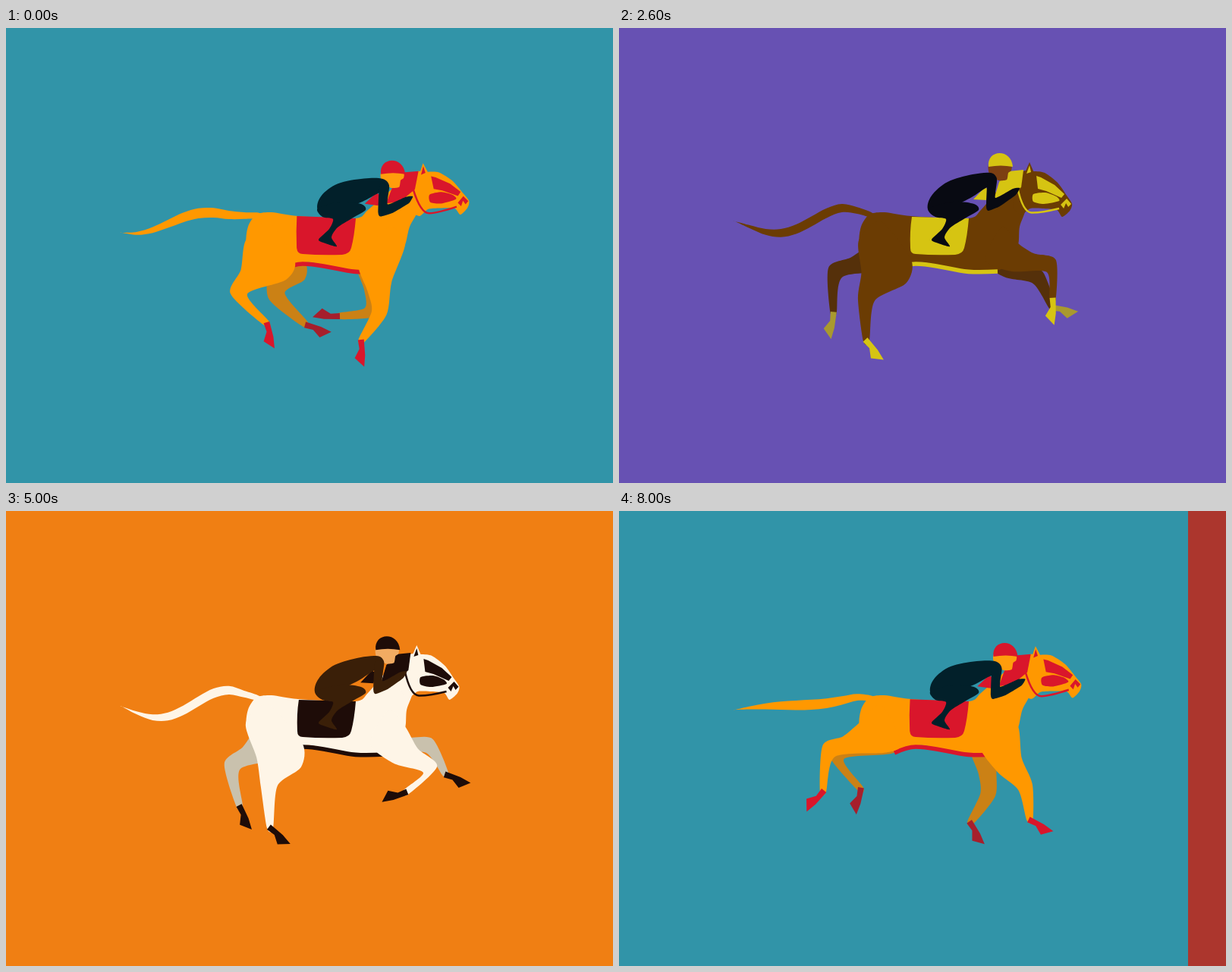
An HTML page with a canvas that plays this animation: 800x600 px, repeating every 8.1 s.

```html
<!DOCTYPE html>
<html lang="en">
<head>
<meta charset="utf-8">
<title>Gallop</title>
<style>
html, body { margin: 0; width: 100%; height: 100%; overflow: hidden; background: #3194a8; }
canvas { display: block; width: 800px; height: 600px; }
</style>
</head>
<body>
<canvas id="stage" width="800" height="600"></canvas>
<script>
const ctx = document.getElementById('stage').getContext('2d');
const LOOP = 8100, STRIDE = LOOP / 20, POSES = 12, STEP = 100;
const FIRST_WIPE = 1210, WIPE_EVERY = LOOP / 5, WIPE_SPEED = 2.42;

const scheme = (bg, coat, farCoat, trim, farTrim, suit, face) =>
  ({ bg, coat, farCoat, trim, farTrim, suit, face });
const SCHEMES = [
  scheme('#3194a8', '#ff9800', '#cb8115', '#d9162b', '#a61f2c', '#02202a', '#ff9d0c'),
  scheme('#6751b3', '#6b3c03', '#55300a', '#d6c412', '#a9992e', '#080a12', '#7c3f12'),
  scheme('#45620f', '#fdb55c', '#c6954c', '#d23a10', '#a63413', '#002c08', '#ff9a0a'),
  scheme('#f07f13', '#fef5e7', '#c9c1ad', '#1e0c08', '#1e0c08', '#3a1f08', '#f2ab62'),
  scheme('#ac362d', '#a0672c', '#80521f', '#1e0c08', '#1e0c08', '#2a1208', '#cf8a4a')
];

// One leg of each pair. Steps hold ankle x, ankle y and hoof angle, evenly
// spaced over the stride; the far leg runs ahead on the same track.
const HIND = {
  hip: [345, 286], bones: [75, 54], bend: -1, knee: 11,
  crest: [345, 255], edge: [316, 280], belly: [416, 303], bulge: [4, 2], groin: [.5, 196],
  far: [4, -12],
  steps: [[344, 390, 73], [392, 404, 15], [348, 418, 38], [304, 402, 62], [262, 376, 125], [288, 370, 120]]
};
const FRONT = {
  hip: [495, 300], bones: [76, 44], bend: 1, knee: 10,
  crest: [505, 262], edge: [526, 284], belly: [467, 310], bulge: [-5, 2], groin: [.45, 250],
  far: [-24, -4],
  steps: [[468, 413, 83], [462, 384, 178], [527, 371, 158], [604, 352, 18], [570, 398, 18], [512, 412, 38]]
};

const mix = (a, b, k) => a.map((v, i) => v + (b[i] - v) * k);
const add = (a, b, k = 1) => [a[0] + b[0] * k, a[1] + b[1] * k];
const pairs = list => {
  const out = [];
  for (let i = 0; i < list.length; i += 2) out.push([list[i], list[i + 1]]);
  return out;
};

// Smooth value on a cyclic list of keys.
function cycle(keys, u) {
  const n = keys.length, i = Math.floor(u), k = u - i;
  const [a, b, c, d] = [-1, 0, 1, 2].map(o => keys[(i + o + n) % n]);
  return b.map((v, j) => v + .5 * k * (c[j] - a[j] +
    k * (2 * a[j] - 5 * v + 4 * c[j] - d[j] + k * (3 * (v - c[j]) + d[j] - a[j]))));
}

function poly(color, list) {
  ctx.fillStyle = color;
  ctx.beginPath();
  pairs(list).forEach(p => ctx.lineTo(...p));
  ctx.fill();
}

// Closed curve through every point.
function blob(color, pts, pull = 1 / 6) {
  const n = pts.length, at = i => pts[(i + n) % n];
  ctx.fillStyle = color;
  ctx.beginPath();
  ctx.moveTo(...pts[0]);
  for (let i = 0; i < n; i++) {
    const [a, b, c, d] = [at(i - 1), at(i), at(i + 1), at(i + 2)];
    ctx.bezierCurveTo(
      b[0] + (c[0] - a[0]) * pull, b[1] + (c[1] - a[1]) * pull,
      c[0] - (d[0] - b[0]) * pull, c[1] - (d[1] - b[1]) * pull, c[0], c[1]);
  }
  ctx.fill();
}

function line(color, width, list) {
  const pts = pairs(list), last = pts.length - 1;
  ctx.strokeStyle = color;
  ctx.lineWidth = width;
  ctx.beginPath();
  ctx.moveTo(...pts[0]);
  for (let i = 1; i < last; i++) {
    ctx.quadraticCurveTo(...pts[i], ...(i === last - 1 ? pts[last] : mix(pts[i], pts[i + 1], .5)));
  }
  ctx.stroke();
}

function hoof(color, ankle, degrees) {
  ctx.save();
  ctx.translate(...ankle);
  ctx.rotate(degrees * Math.PI / 180);
  poly(color, [-2, 4, 10, 3.5, 21, 11, 34, 0, 19, -3, -2, -4]);
  ctx.restore();
}

function leg(kind, q, isFar, coat, trim) {
  const shift = isFar ? kind.far : [0, 0];
  const [x, y, angle] = cycle(kind.steps, (q + (isFar ? 2 : 0)) % POSES / 2);
  const ankle = add([x, y], shift), hip = add(kind.hip, shift, .5);

  // Two bones from hip to ankle.
  const dx = ankle[0] - hip[0], dy = ankle[1] - hip[1], dist = Math.hypot(dx, dy);
  const grow = Math.max(1, dist / (kind.bones[0] + kind.bones[1]));
  const [upper, lower] = kind.bones.map(b => b * grow);
  const along = (upper ** 2 - lower ** 2 + dist ** 2) / (2 * dist);
  const off = Math.sqrt(Math.max(0, upper ** 2 - along ** 2));
  const dir = [dx / dist, dy / dist], out = [dir[1] * kind.bend, -dir[0] * kind.bend];
  const knee = add(add(hip, dir, along), out, off);
  const shin = [(ankle[0] - knee[0]) / lower, (ankle[1] - knee[1]) / lower];
  const shinOut = [shin[1] * kind.bend, -shin[0] * kind.bend];

  const outer = add(knee, out, kind.knee), inner = add(knee, out, -kind.knee);
  const edge = isFar ? mix(kind.edge, kind.hip, .5) : kind.edge;
  const groin = add(mix(inner, kind.belly, .5), [2, 5]);
  blob(coat, [kind.crest, edge, add(mix(edge, outer, .52), kind.bulge), outer,
    add(ankle, shinOut, 4), add(ankle, shinOut, -4), inner, groin,
    [groin[0] * kind.groin[0] + kind.groin[1], 306]], .13);
  hoof(trim, ankle, angle);
}

// A wave that runs from the tip up to the dock.
function tail(q, color) {
  const top = [], low = [], n = 9;
  for (let i = 0; i <= n; i++) {
    const s = i / n, x = 334 - 181 * s;
    const wave = Math.cos((q - (x - 153) * .07) * Math.PI / 6);
    const y = 247 + 15 * s - 7 * Math.sin(s * 2 * Math.PI) + 8 * Math.min(1, s * 4) * wave;
    const w = 3 * (1 - s) + 5 * Math.sin(s * Math.PI);
    top.push([x, y - w]);
    low.unshift([x, y + w]);
  }
  blob(color, top.concat(low));
}

function head(c, h) {
  ctx.save();
  ctx.translate(545 + 11 * h, 190 + h);
  ctx.rotate(-.1 * h);
  ctx.translate(-545, -190);
  blob(c.coat, pairs([530, 191, 546, 189, 561, 191, 578, 204, 590, 221, 597, 232,
    594, 241, 584, 249, 577, 240, 558, 238, 542, 238, 530, 246, 520, 235]), .12);
  poly(c.coat, [534, 193, 541, 177, 547, 191]);
  poly(c.trim, [537, 192, 541, 181, 543, 190]);
  poly(c.trim, [550, 195, 556, 197, 574, 207, 587, 219, 583, 224, 563, 215, 552, 212]);
  blob(c.trim, pairs([546, 219, 562, 217, 576, 222, 580, 228, 560, 232, 546, 229]), .12);
  poly(c.trim, [582, 233, 590, 225, 596, 232, 592, 236, 589, 231, 586, 238]);
  line(c.trim, 2.5, [525, 210, 532, 243, 555, 244, 580, 238]);
  ctx.restore();
}

function rider(c, h) {
  // The upper body leans forward while the seat stays put.
  const lean = list => pairs(list).map(([x, y]) => {
    const w = Math.max(0, (x - 410) / 90) * h;
    return [x + 4 * h + 4 * w, y + Math.min(w, 1.1) * 10];
  });
  const sx = 8 * h, sy = 11 * h;
  poly(c.trim, [513 + sx, 189 + 2 * h, 533 + 12 * h, 187 + 2 * h, 530 + 10 * h, 210 + 3 * h,
    512 + sx, 224 + 6 * h, 494 + sx, 226 + 6 * h, 501 + sx, 203 + sy]);
  poly(c.trim, lean([467, 226, 482, 210, 488, 214, 484, 227]).flat());
  blob(c.face, pairs([488, 180, 516, 181, 517, 188, 513, 191, 511, 200, 500, 201, 488, 192])
    .map(p => add(p, [sx, sy])), .1);
  ctx.fillStyle = c.trim;
  ctx.beginPath();
  ctx.moveTo(487 + sx, 183 + sy);
  ctx.bezierCurveTo(484 + sx, 160 + sy, 517 + sx, 158 + sy, 519 + sx, 183 + sy);
  ctx.quadraticCurveTo(503 + sx, 180 + sy, 487 + sx, 183 + sy);
  ctx.fill();
  blob(c.suit, lean([407, 239, 412, 221, 433, 203, 466, 193, 490, 191, 498, 199,
    492, 206, 480, 213, 465, 223, 440, 236, 420, 249]));
  blob(c.suit, lean([486, 199, 498, 200, 496, 224, 519, 212, 528, 211, 523, 220, 502, 235, 487, 241, 484, 236]), .08);
  blob(c.suit, pairs([408 + 3 * h, 238, 417, 249, 431, 252, 426, 265, 412, 279, 421, 284, 436, 288,
    429, 276, 437, 263, 456, 251, 474, 240, 468, 232, 440, 229]), .13);
}

function saddle(color, h) {
  ctx.fillStyle = color;
  ctx.beginPath();
  ctx.moveTo(386 - 3 * h, 249 - h);
  ctx.lineTo(461, 251);
  ctx.quadraticCurveTo(459, 275, 455, 290);
  ctx.quadraticCurveTo(453, 298, 443, 299);
  ctx.quadraticCurveTo(415, 300, 391, 298);
  ctx.quadraticCurveTo(384, 298, 384 - h, 290);
  ctx.quadraticCurveTo(383 - h, 268, 386 - 3 * h, 249 - h);
  ctx.fill();
}

function scene(c, q) {
  const h = .5 - .5 * Math.cos((q - 4.7) * Math.PI / 6), n = 9 * h;
  ctx.fillStyle = c.bg;
  ctx.fillRect(0, 0, 800, 600);

  tail(q, c.coat);
  leg(FRONT, q, true, c.farCoat, c.farTrim);
  leg(HIND, q, true, c.farCoat, c.farTrim);
  blob(c.coat, pairs([330, 246, 350, 243, 385, 248, 460, 251, 477, 240, 500 + n, 213, 530 + n, 190,
    543 + n, 195, 537 + n, 236, 528 + n / 2, 262, 526, 286, 514, 310, 498, 320, 470, 320,
    440, 317, 402, 309, 386, 311, 362, 317, 330, 305, 317, 285, 319, 262]), .14);
  line(c.trim, 5.5, [363, 319, 380, 311, 402, 311, 435, 317, 465, 323, 499, 321]);
  leg(FRONT, q, false, c.coat, c.trim);
  leg(HIND, q, false, c.coat, c.trim);
  saddle(c.trim, h);
  head(c, h);
  rider(c, h);
}

function draw(now) {
  const t = Math.floor(now % LOOP / STEP) * STEP;
  const q = Math.floor((t % STRIDE + 4) / (STRIDE / POSES)) % POSES;
  const since = t - FIRST_WIPE, done = Math.floor(since / WIPE_EVERY) + 1;
  const edge = done ? (since - (done - 1) * WIPE_EVERY) * WIPE_SPEED : 800;
  if (edge < 800) scene(SCHEMES[done - 1], q);
  ctx.save();
  ctx.beginPath();
  ctx.rect(0, 0, Math.min(800, Math.round(edge)), 600);
  ctx.clip();
  scene(SCHEMES[done % SCHEMES.length], q);
  ctx.restore();
}

const start = performance.now();
function tick() {
  draw(performance.now() - start);
  requestAnimationFrame(tick);
}
tick();
</script>
</body>
</html>
```
